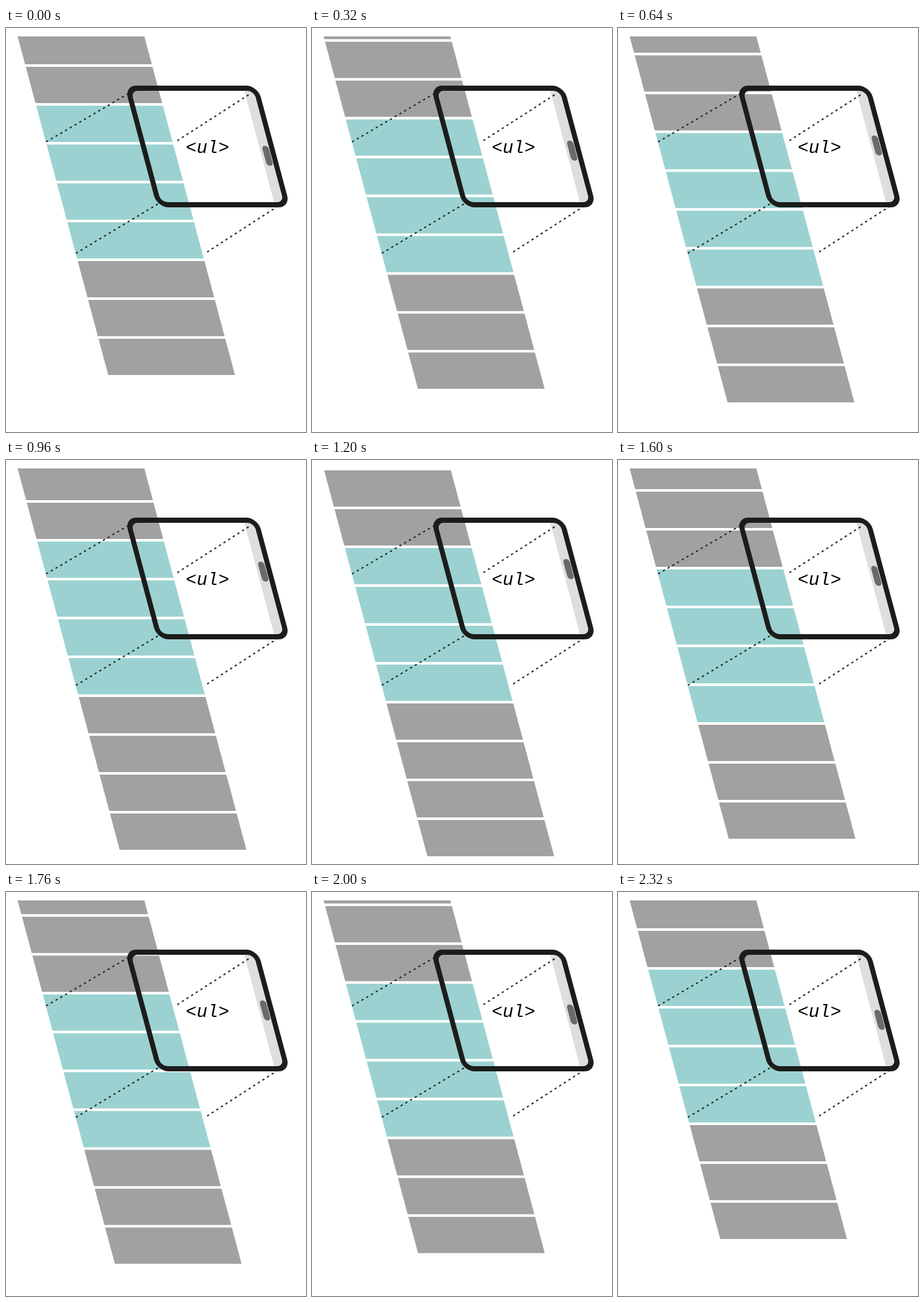
Write an HTML page with a canvas that moves like this. It is 464 px wide and 624 px high and loops after 2.4 s.

```html
<!DOCTYPE html>
<html lang="en">
<head>
<meta charset="utf-8">
<title>Recycled list scrolling</title>
<style>
  html, body { margin: 0; width: 100%; height: 100%; overflow: hidden; background: #fff; }
  canvas { display: block; }
</style>
</head>
<body>
<canvas width="464" height="624"></canvas>
<script>
const ctx = document.querySelector('canvas').getContext('2d');
const LOOP = 2400, STEP = 80, PITCH = 60, SKEW = Math.tan(Math.PI / 12);

// [step, scroll distance]
const KEYS = [[0, 0], [8, 42.3], [12, 66], [14, 76.8], [15, 76], [18, 59.6], [22, 38.2], [29, 0]];
const LINES = [
  [62, 176, 188, 102],
  [265, 174, 377, 102],
  [108, 348, 238, 270],
  [311, 346, 421, 275]
];

function scrollAt(step) {
  const i = KEYS.findIndex(key => key[0] >= step);
  if (i < 1) return 0;
  const [s0, p0] = KEYS[i - 1], [s1, p1] = KEYS[i];
  return p0 + (p1 - p0) * (step - s0) / (s1 - s0);
}

function box(x, y, w, h, radii, color) {
  ctx.beginPath();
  ctx.roundRect(x, y, w, h, radii);
  ctx.fillStyle = color;
  ctx.fill();
}

function drawList(scroll) {
  const first = scroll >= 57 ? 1 : 2;
  ctx.save();
  ctx.transform(1, 0, SKEW, 1, 0, 0);
  ctx.beginPath();
  ctx.rect(0, 13, 464, 611);
  ctx.clip();
  for (let row = -2; row < 9; row++) {
    const active = row >= first && row < first + 4;
    box(14.5, row * PITCH + scroll, 196, 56, 0, active ? '#9bd2d1' : '#a1a1a1');
  }
  ctx.restore();
}

function drawLines() {
  ctx.save();
  ctx.strokeStyle = '#222';
  ctx.lineWidth = 2;
  ctx.setLineDash([3.5, 5]);
  for (const [x0, y0, x1, y1] of LINES) {
    ctx.beginPath();
    ctx.moveTo(x0, y0);
    ctx.lineTo(x1, y1);
    ctx.stroke();
  }
  ctx.restore();
}

function drawDevice(scroll) {
  ctx.save();
  ctx.transform(1, 0, SKEW, 1, 0, 0);
  box(342.5, 93, 19, 180, [0, 14, 14, 0], '#dedede');
  drawInPlace(drawLines);
  box(346.6, 182 - scroll * 0.38, 10, 31, 5, '#676b6b');
  ctx.beginPath();
  ctx.roundRect(163.5, 93, 198, 180, 14);
  ctx.strokeStyle = '#1c1c1c';
  ctx.lineWidth = 8;
  ctx.stroke();
  ctx.restore();
}

// Runs a drawing function without the current skew.
function drawInPlace(draw) {
  ctx.save();
  ctx.resetTransform();
  draw();
  ctx.restore();
}

function frame(now) {
  const scroll = scrollAt(Math.floor(now % LOOP / STEP));
  ctx.fillStyle = '#fff';
  ctx.fillRect(0, 0, 464, 624);
  drawList(scroll);
  drawDevice(scroll);
  ctx.fillStyle = '#000';
  ctx.font = 'italic 28px "Liberation Mono", monospace';
  ctx.fillText('<ul>', 278, 193);
}

let start;
function tick(now) {
  start ??= now;
  frame(now - start);
  requestAnimationFrame(tick);
}
frame(0);
requestAnimationFrame(tick);
</script>
</body>
</html>
```
